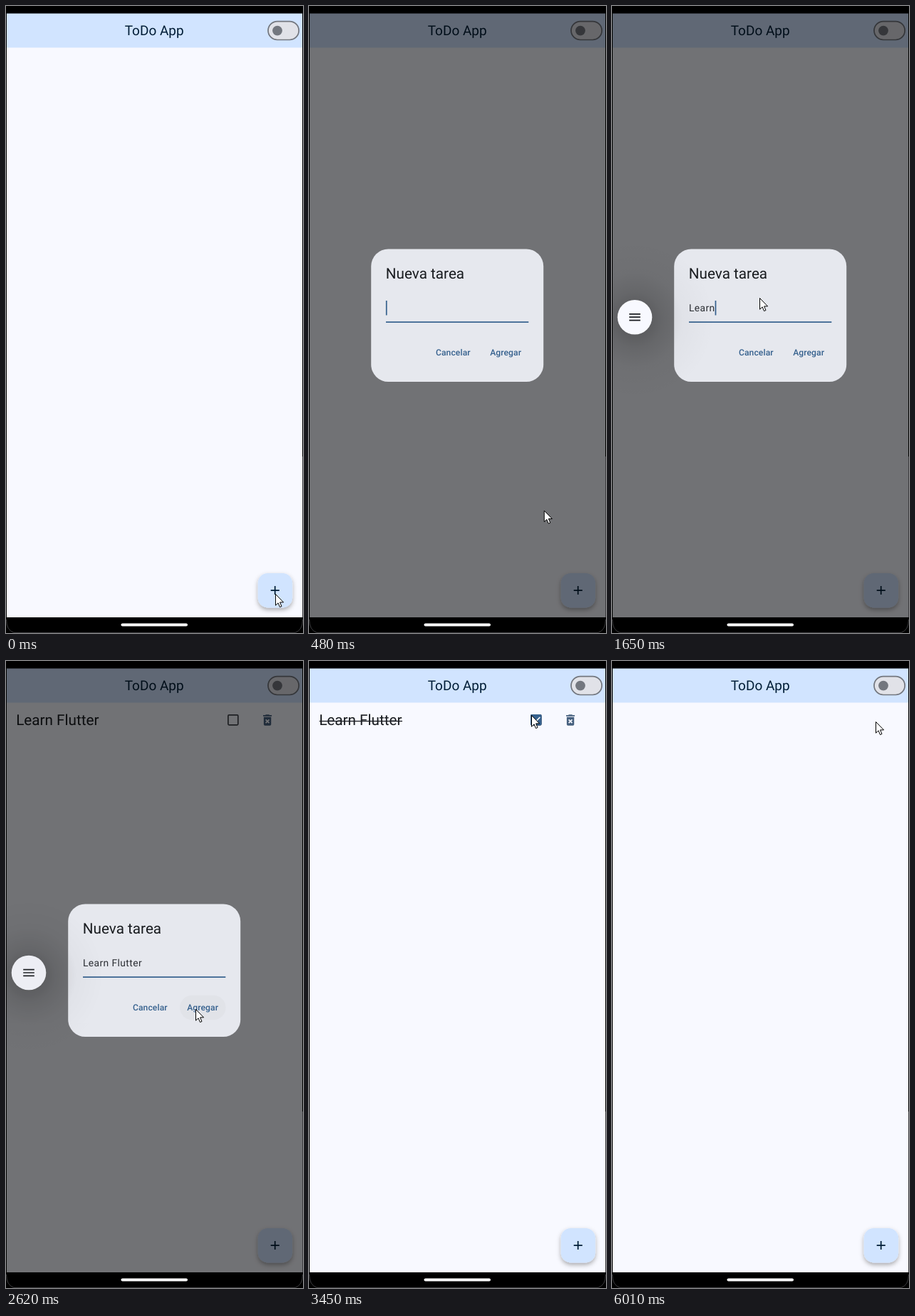
These frames come from a looping animation (417 by 881 pixels, 6.47 s). An HTML page:

```html
<!DOCTYPE html>
<html lang="es">
<head>
<meta charset="utf-8">
<title>ToDo App</title>
<style>
  html, body { margin: 0; width: 100%; height: 100%; overflow: hidden; background: #000; }
  svg { display: block; font-family: Roboto, sans-serif; }
  text { white-space: pre; text-rendering: geometricPrecision; }
  .button { font-size: 12.1px; font-weight: 500; letter-spacing: .09px; fill: #36618e; }
</style>
</head>
<body>
<svg width="417" height="881" viewBox="0 0 417 881">
  <defs>
    <radialGradient id="halo">
      <stop offset=".2" stop-opacity=".18"/>
      <stop offset=".35" stop-opacity=".1"/>
      <stop offset=".6" stop-opacity=".025"/>
      <stop offset="1" stop-opacity="0"/>
    </radialGradient>
    <filter id="lift" x="-50%" y="-50%" width="200%" height="200%">
      <feDropShadow dx="0" dy="3" stdDeviation="3" flood-opacity=".32"/>
    </filter>
  </defs>

  <rect width="417" height="881"/>
  <rect x="1" y="10" width="415" height="849" fill="#f8f9ff"/>
  <rect x="1" y="10" width="415" height="48.5" fill="#d1e4ff"/>
  <text x="208.2" y="41" font-size="19" text-anchor="middle" fill="#001d36">ToDo App</text>
  <g fill="#73777f">
    <rect x="368" y="21.6" width="43.2" height="25.9" rx="12.95" fill="#e1e2e8" stroke="#73777f" stroke-width="1.73"/>
    <circle cx="381" cy="34.6" r="6.9"/>
  </g>

  <g id="task">
    <text x="14.2" y="90.2" font-size="20.7" fill="#191c20">Learn Flutter</text>
    <rect id="strike" x="14.5" y="83.9" width="116.5" height="1.3" fill="#191c20"/>
    <rect x="311.9" y="75.9" width="13.9" height="13.9" rx="1.2" fill="none" stroke="#43474e" stroke-width="1.73"/>
    <g id="checked">
      <rect x="311" y="75" width="15.6" height="15.6" rx="1.8" fill="#36618e"/>
      <path d="M313.4 82.1l3.9 3.9l7-7" fill="none" stroke="#fff" stroke-width="1.73"/>
    </g>
    <g transform="translate(356.7 72.6) scale(.864)">
      <path d="M6 7h12v12q0 2-2 2H8q-2 0-2-2zM5 6V4h3.5l1-1h5l1 1H19v2z" fill="#47617f"/>
      <path d="M9.2 11.2l5.6 5.6m0-5.6l-5.6 5.6" stroke="#f8f9ff" stroke-width="2"/>
    </g>
  </g>

  <rect x="353.7" y="797" width="48.4" height="48.4" rx="13.8" fill="#d1e4ff" filter="url(#lift)"/>
  <path d="M371.7 821.1h12.1M377.7 815v12.1" stroke="#001d36" stroke-width="1.73"/>

  <rect id="scrim" x="1" y="10" width="415" height="849" fill-opacity=".54"/>
  <g id="dialog">
    <rect x="87.2" y="341.5" width="242" height="186.5" rx="24.2" fill="#e6e8ee"/>
    <text x="107.8" y="383" font-size="20.7" fill="#191c20">Nueva tarea</text>
    <text id="field" x="107.9" y="428.8" font-size="13.8" letter-spacing=".43" fill="#2b2e33"></text>
    <rect id="caret" y="414" width="1.73" height="20.5" fill="#36618e"/>
    <rect x="108" y="443.3" width="200.3" height="1.73" fill="#36618e"/>
    <rect id="ripple" x="244" y="469.7" width="64.6" height="34.5" rx="17.25" fill="#191c20" fill-opacity=".025"/>
    <text class="button" x="178" y="491">Cancelar</text>
    <text class="button" x="254.2" y="491">Agregar</text>
  </g>

  <g id="bubble">
    <circle cx="32" cy="441" r="112" fill="url(#halo)"/>
    <circle cx="32" cy="437.2" r="24.3" fill="#f8f9ff"/>
    <path d="M24.2 432.8h15.6M24.2 437.2h15.6M24.2 441.6h15.6" stroke="#191c20" stroke-width="1.73"/>
  </g>

  <path d="M0 0H417V10.4H0zM0 10H1V859H0zM416 10H417V859H416zM0 859H417V881H0z"/>
  <path d="M416.5 633V859M.5 862Q.5 877 11 880.5H406Q416.5 877 416.5 862" fill="none" stroke="#3c3c3f"/>
  <rect x="161.5" y="867.4" width="93.5" height="4" rx="2" fill="#fff"/>

  <circle id="click" r="12" fill="#ff0" fill-opacity=".58"/>
  <path id="cursor" d="M.5 .5V16.2L4.1 12.8L6.5 18.6L9 17.5L6.6 11.9H11.6Z" fill="#fff" stroke="#000" stroke-linejoin="round"/>
</svg>
<script>
const LOOP = 6470;
const STEP = 69; // the screen refreshes this often while things move
const TASK = 'Learn Flutter';
const START = { x: 378, y: 826 };
const MOVES = [
  { from: 270, to: 878, x: 207, y: 410 },
  { from: 1650, to: 2270, x: 266, y: 489 },
  { from: 2620, to: 2960, x: 312, y: 76 },
  { from: 3770, to: 3960, x: 317, y: 88 },
  { from: 4180, to: 4370, x: 317, y: 80 },
  { from: 5530, to: 5720, x: 370, y: 85 }
];
const CLICKS = [200, 2420, 3170, 4930, 5940];
const [, SUBMIT, CHECK, UNCHECK, REMOVE] = CLICKS;

const el = {};
document.querySelectorAll('svg > [id], svg g [id]').forEach(n => el[n.id] = n);

const ramp = (t, a, b) => Math.min(1, Math.max(0, (t - a) / (b - a)));
const smooth = k => k * k * (3 - 2 * k);
const within = (t, a, b) => t >= a && t < b;
const fade = (node, v) => node.setAttribute('opacity', v);
const show = (node, on) => fade(node, on ? 1 : 0);

function pointer(t) {
  let { x, y } = START;
  for (const m of MOVES) {
    const k = smooth(ramp(t, m.from, m.to));
    x += (m.x - x) * k;
    y += (m.y - y) * k;
  }
  return `translate(${x} ${y})`;
}

// The first word slows down letter by letter, the second runs at an even pace.
function typed(t) {
  if (t < 1080) return 0;
  return Math.floor(1 + 4 * ramp(t, 1080, 1640) ** (2 / 3) + 8 * ramp(t, 1650, 2200));
}

function draw(time) {
  const t = Math.floor((time + 8) / STEP) * STEP;

  const open = ramp(t, 340, 480) - ramp(t, 2630, 2800);
  fade(el.scrim, open);
  fade(el.dialog, open);
  el.field.textContent = TASK.slice(0, typed(t));
  el.caret.setAttribute('x', 107.9 + el.field.getComputedTextLength());
  show(el.caret, time < SUBMIT + 150);
  show(el.ripple, time >= SUBMIT + 150);

  const closing = ramp(t, 2610, 2760);
  fade(el.bubble, ramp(t, 1060, 1200) - closing);
  el.bubble.setAttribute('transform', `translate(0 ${closing * 10})`);

  show(el.task, within(time, SUBMIT + 150, REMOVE + 65));
  show(el.strike, within(time, CHECK + 65, UNCHECK + 65));
  fade(el.checked, ramp(t, CHECK + 20, CHECK + 190) - ramp(t, UNCHECK + 30, UNCHECK + 250));

  const place = pointer(t);
  el.cursor.setAttribute('transform', place);
  el.click.setAttribute('transform', place);
  show(el.click, CLICKS.some(c => within(time, c, c + 70)));
}

const begin = performance.now();
function tick() {
  draw((performance.now() - begin) % LOOP);
  requestAnimationFrame(tick);
}
tick();
</script>
</body>
</html>
```
